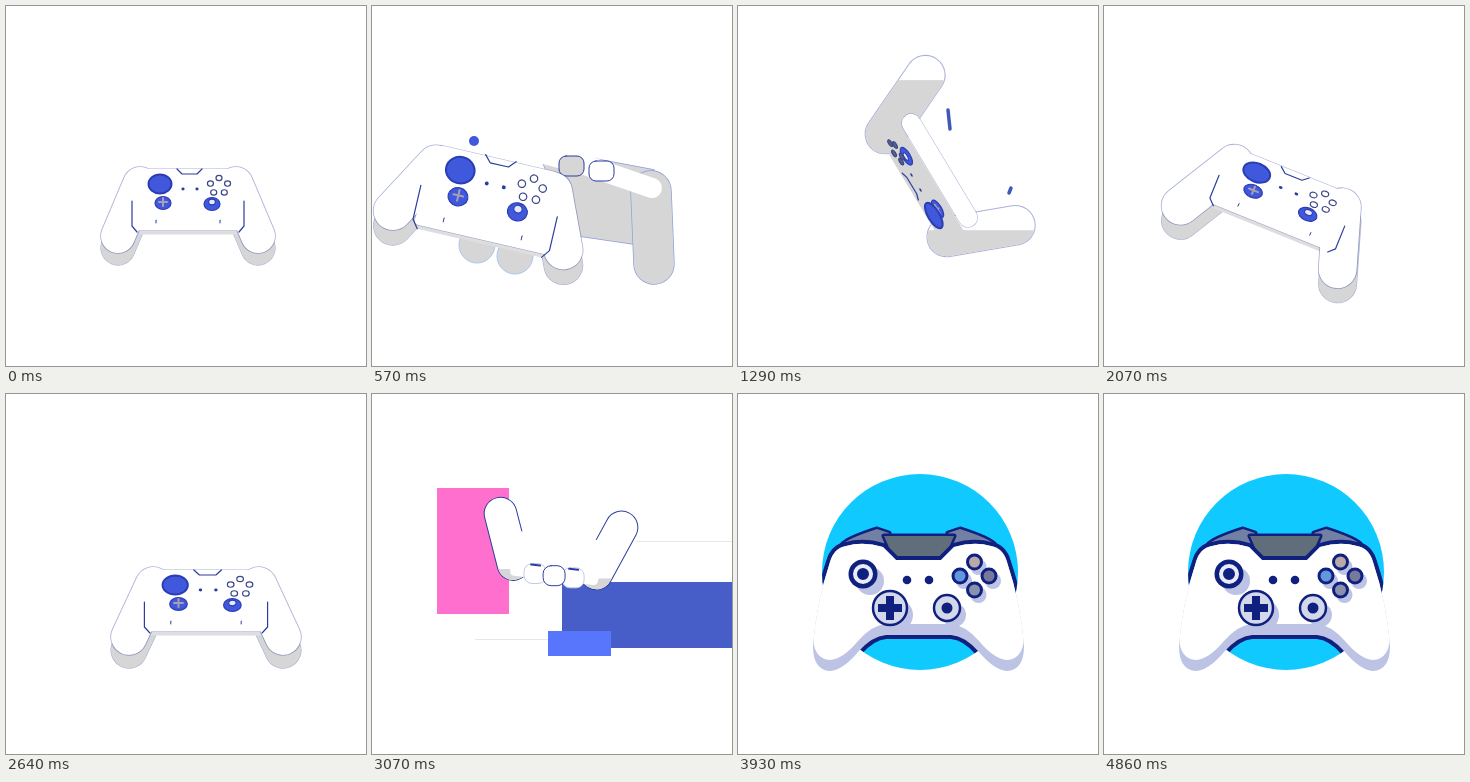
Write an HTML page with a canvas that moves like this. It is 360x360 px and loops after 5000 ms.

```html
<!DOCTYPE html>
<html lang="en">
<head>
<meta charset="utf-8">
<title>Game controller</title>
<style>
html, body { margin: 0; width: 100%; height: 100%; overflow: hidden; background: #fff; }
canvas { display: block; width: 100%; height: 100%; }
</style>
</head>
<body>
<canvas id="stage" width="360" height="360"></canvas>
<script>
const ctx = document.getElementById('stage').getContext('2d');
const LOOP = 5000, FRAME = LOOP / 70, TAU = Math.PI * 2;
const NAVY = '#10207f', CYAN = '#10caff', LAVENDER = '#bcc3e4', GREY = '#d6d6d6';
const INK = '#2c3d9f', FAINT = 'rgba(44,61,159,.4)', BLUE = '#4058dc', RIM = '#2b3db4';
const mix = (a, b, k) => a + (b - a) * k;
const clamp = x => Math.max(0, Math.min(1, x));
const smooth = x => x * x * (3 - 2 * x);
const easeOut = x => 1 - (1 - clamp(x)) ** 3;

// turn: degrees; wide, tall: face scale, negative tall shows the back;
// reachX, reachY: how far the grips lean out of the plane of the face.
const front = { time: 0, x: 182, y: 192, turn: 0, wide: 1, tall: 1, reachX: 0, reachY: 0 };
const poses = [
  front,
  { time: 570, x: 118, y: 191, turn: 13, wide: 1.25, tall: 1.39, reachX: 0, reachY: -18 },
  { ...front, time: 930, turn: -54, wide: 1.5, tall: 1.2 },
  { time: 1290, x: 182, y: 177, turn: -121, wide: 1.25, tall: .35, reachX: 39, reachY: -26 },
  { time: 2070, x: 179, y: 192, turn: 22, wide: 1.21, tall: .98, reachX: -10, reachY: 5 },
  { ...front, time: 2640, x: 200, y: 205, wide: 1.1 },
  { time: 3070, x: 184, y: 165, turn: 6.5, wide: .87, tall: -.7, reachX: 2, reachY: -12 },
  { ...front, time: 3500, wide: 1.35, tall: 1.3 }
];

function poseAt(t) {
  const next = Math.max(1, poses.findIndex(p => p.time > t));
  const a = poses[next - 1], b = poses[next];
  const k = smooth((t - a.time) / (b.time - a.time)), result = {};
  for (const key in a) result[key] = mix(a[key], b[key], k);
  return result;
}

function fill(path, color) { ctx.fillStyle = color; ctx.fill(path); }
function stroke(path, color, width = 1) {
  ctx.strokeStyle = color; ctx.lineWidth = width; ctx.stroke(path);
}
function blob(path, color, round) { stroke(path, color, round); fill(path, color); }
function ellipse(x, y, rx, ry, color, line, width, angle = 0) {
  const path = new Path2D();
  path.ellipse(x, y, rx, ry, angle, 0, TAU);
  if (color) fill(path, color);
  if (line) stroke(path, line, width);
}
const disc = (x, y, r, color, line, width) => ellipse(x, y, r, r, color, line, width);
function rect(x, y, w, h, color) { ctx.fillStyle = color; ctx.fillRect(x, y, w, h); }
function trace(...points) {
  const path = new Path2D();
  points.forEach(p => path.lineTo(...p));
  return path;
}
function capsule([x1, y1], [x2, y2], r) {
  const a = Math.atan2(y2 - y1, x2 - x1), q = Math.PI / 2, path = new Path2D();
  path.arc(x1, y1, r, a + q, a + 3 * q);
  path.arc(x2, y2, r, a - q, a + q);
  path.closePath();
  return path;
}
function moved(path, x, y, mirror = 1) {
  const copy = new Path2D();
  copy.addPath(path, new DOMMatrix([mirror, 0, 0, 1, x, y]));
  return copy;
}

function drawController(t) {
  const { x: cx, y: cy, turn, wide, tall, reachX, reachY } = poseAt(t);
  const angle = turn * Math.PI / 180, cos = Math.cos(angle), sin = Math.sin(angle);
  const at = (x, y) => [cx + x * wide * cos - y * tall * sin, cy + x * wide * sin + y * tall * cos];
  const back = tall < 0, under = tall < .45, radius = 8 + 9 * wide;
  const grips = [-1, 1].map(side => {
    const base = at(side * 48, -14), [x, y] = at(side * 70, 38), tip = [x + reachX, y + reachY];
    return { base, tip, path: capsule(base, tip, radius) };
  });
  const body = trace(at(-46, -25), at(46, -25), at(52, 28), at(-51, 28));
  body.closePath();
  ctx.lineJoin = ctx.lineCap = 'round';

  if (under) {
    if (!back) blob(body, GREY, 6);
    grips.forEach(({ path, base, tip }) => {
      stroke(path, back ? INK : FAINT, 2);
      fill(path, '#fff');
      ctx.save();
      ctx.clip(path);
      rect(0, (back ? base : tip)[1] + 5, 360, 360, GREY);
      ctx.restore();
    });
    if (back) {
      blob(body, '#fff', 8);
      drawTriggers(at);
      return;
    }
    blob(body, GREY, 6);
    const ridge = moved(trace(at(-44, 33), at(44, 33)), reachX / 4, reachY / 4);
    stroke(ridge, FAINT, 20);
    stroke(ridge, '#fff', 19);
  } else {
    grips.forEach(({ path }) => {
      const end = moved(path, 0, 12 * wide);
      stroke(end, FAINT, 1.2);
      fill(end, GREY);
    });
    blob(moved(body, 0, 4), '#dedede', 9);
    grips.forEach(g => stroke(g.path, FAINT, 1.6));
    stroke(body, FAINT, 10);
    grips.forEach(g => fill(g.path, '#fff'));
    blob(body, '#fff', 9);
    for (const side of [-1, 1]) {
      stroke(trace(at(side * 56, 3), at(side * 56, 28), at(side * 51, 34)), INK, 1.2);
      stroke(trace(at(side * 32, 22), at(side * 32, 25)), INK);
    }
  }
  drawFace(at, angle, wide, tall, under);
}

function drawFace(at, angle, wide, tall, under) {
  const knob = (x, y, rx, ry, color, edge, width = 1.2) =>
    ellipse(...at(x, y), rx * wide, ry * Math.max(tall, .6), color, edge, width, angle);
  knob(-25, 5, 8, 6.5, BLUE, RIM);
  stroke(trace(at(-29, 4), at(-21, 4)), '#a99fb0', 2);
  stroke(trace(at(-25, 0), at(-25, 8)), '#a99fb0', 2);
  knob(-28, -14, 11.5, 9.5, BLUE, RIM, 2);
  knob(24, 6, 8, 6.5, BLUE, RIM);
  knob(24, 4, 3.4, 2.8, '#e6e9f8', RIM);
  for (const x of [-5, 9]) knob(x, -9, 1.6, 1.4, INK);
  for (let i = 0; i < 5; i++) {
    const a = (i / 5 - .25) * TAU;
    knob(31 + 9 * Math.cos(a), -12 + 8 * Math.sin(a), 3, 2.7, under ? '#56618f' : '#fff', '#3b4788');
  }
  stroke(trace(at(-11, -29), at(-6, -24), at(9, -24), at(14, -29)), INK, 1.2);
}

function drawTriggers(at) {
  for (const side of [-1, 1, 0]) {
    const [x, y] = at(side * 22, -24), path = new Path2D();
    path.roundRect(x - 11, y - 10, 22, 20, 8);
    fill(path, '#fff');
    stroke(path, side ? '#c3c9e8' : INK);
    if (side) stroke(trace([x - 4, y - 9], [x + 5, y - 8]), INK, 2);
  }
}

// A second pad seen from behind while the first one swings forward.
function drawBackPad() {
  const panel = new Path2D('M165 142L282 164L262 238L200 229Z');
  const grip = capsule([279, 185], [282, 258], 20);
  ctx.lineJoin = 'round';
  for (const x of [105, 143]) disc(x, mix(239, 250, (x - 105) / 38), 18, GREY, '#a8c8ef');
  for (const part of [panel, grip]) {
    stroke(part, '#8d9cdd', 1.4);
    fill(part, GREY);
  }
  blob(trace([165, 146], [210, 158], [280, 182]), '#fff', 20);
  for (const x of [199, 229]) {
    const hook = new Path2D();
    hook.roundRect(x - 12, 150 + (x - 199) / 6, 25, 20, 7);
    fill(hook, x < 210 ? GREY : '#fff');
    stroke(hook, INK);
  }
  disc(102, 135, 5, BLUE);
}

function drawRoom(t) {
  const k = easeOut((t - 2860) / 210);
  rect(65, 94, 72 * k, 126, '#ff6fcd');
  rect(360 - 170 * k, 188, 170 * k, 66, '#475ec8');
  rect(176, 237, 63 * k, 25, '#5876fc');
  rect(264, 147, 96 * k, 1, '#e6e6e6');
  rect(103, 245, 73 * k, 1, '#e6e6e6');
}

// The icon is built from its left half and mirrored.
const AXIS = 180.5;
function mirrored(data) {
  const half = new Path2D(data), whole = new Path2D(half);
  whole.addPath(moved(half, 2 * AXIS, 0, -1));
  return whole;
}
const shell = mirrored(`M180.5 241H148Q134 242 120 258Q105 276 92 277Q75 276 75 252
  Q78 210 92 168Q96 154 108 152Q125 147 145 153L158 166H180.5`);
const bumpers = mirrored('M104 151Q108 145 139 135L151 139L146 151Q124 145 104 151Z');
const grille = new Path2D('M146 142H216L205 167H157Z');

function drawIconPad(outlineAlpha) {
  ctx.lineJoin = 'round';
  for (const [path, color] of [[bumpers, '#7280a4'], [grille, '#606d7b']]) {
    stroke(path, NAVY, 5);
    fill(path, color);
  }
  ctx.save();
  const area = new Path2D();
  area.arc(182, 178, 98, 0, TAU);
  ctx.clip(area);
  ctx.globalAlpha = outlineAlpha;
  stroke(shell, NAVY, 8);
  ctx.restore();
  fill(shell, LAVENDER);
  ctx.save();
  ctx.clip(shell);
  fill(moved(shell, 0, -11), '#fff');
  ctx.restore();

  const buttons = ['#b9aaa8', '#77799c', '#8992aa', '#6396dd'].map((color, i) => {
    const a = (i - 1) * TAU / 4;
    return { x: 236.5 + 14.5 * Math.cos(a), y: 182 + 14 * Math.sin(a), color };
  });
  buttons.forEach(b => disc(b.x + 4, b.y + 5, 8, LAVENDER));
  for (const [x, y, r] of [[125, 180, 14], [152, 214, 16], [209, 214, 12]]) disc(x + 7, y + 7, r, LAVENDER);
  disc(125, 180, 14.5, NAVY);
  disc(125, 180, 8, NAVY, '#e9edfb', 4);
  disc(152, 214, 17, '#d3d9eb', NAVY, 2.5);
  rect(140, 210, 24, 8, NAVY);
  rect(148, 202, 8, 24, NAVY);
  disc(209, 214, 13, '#d3d9eb', NAVY, 2.5);
  disc(209, 214, 5.5, NAVY);
  for (const x of [169, 191]) disc(x, 186, 4.3, NAVY);
  buttons.forEach(b => disc(b.x, b.y, 7, b.color, NAVY, 3));
}

function drawIcon(t) {
  const k = easeOut((t - 3500) / 430), scale = mix(1.19, 1, k);
  const x = mix(180, 182, k), y = mix(180, 178, k), inner = mix(131, 0, k);
  disc(x, y, mix(183, 98, k), CYAN);
  ctx.save();
  const hole = new Path2D();
  hole.arc(x, y, inner, 0, TAU);
  ctx.clip(hole);
  rect(0, 0, 360, 360, '#fff');
  rect(50, 240, 260, 90, NAVY);
  rect(286, 161, 40, 50, '#4b60c8');
  disc(80, 146, 13, NAVY);
  fill(new Path2D('M256 106Q285 95 315 112V150H268Q255 139 270 128Q270 112 256 106Z'), NAVY);
  ctx.restore();

  ctx.save();
  ctx.translate(mix(181, 180, k), mix(178, 182, k));
  ctx.scale(scale, scale);
  ctx.translate(-180, -182);
  drawIconPad(k);
  ctx.restore();
}

function drawTurntable(t) {
  if (t > 2900) drawRoom(t);
  if (t > 420 && t < 720) drawBackPad();
  drawController(t);
  if (t > 1200 && t < 1440) stroke(new Path2D('M210 104L212 123M273 182L271 187'), '#4058b8', 3.5);
}

const start = performance.now();
function tick() {
  const elapsed = (performance.now() - start) % LOOP;
  const t = Math.floor((elapsed + 5) / FRAME) % 70 * FRAME;
  rect(0, 0, 360, 360, '#fff');
  if (t >= 3495) drawIcon(t);
  else drawTurntable(t);
  requestAnimationFrame(tick);
}
tick();
</script>
</body>
</html>
```
